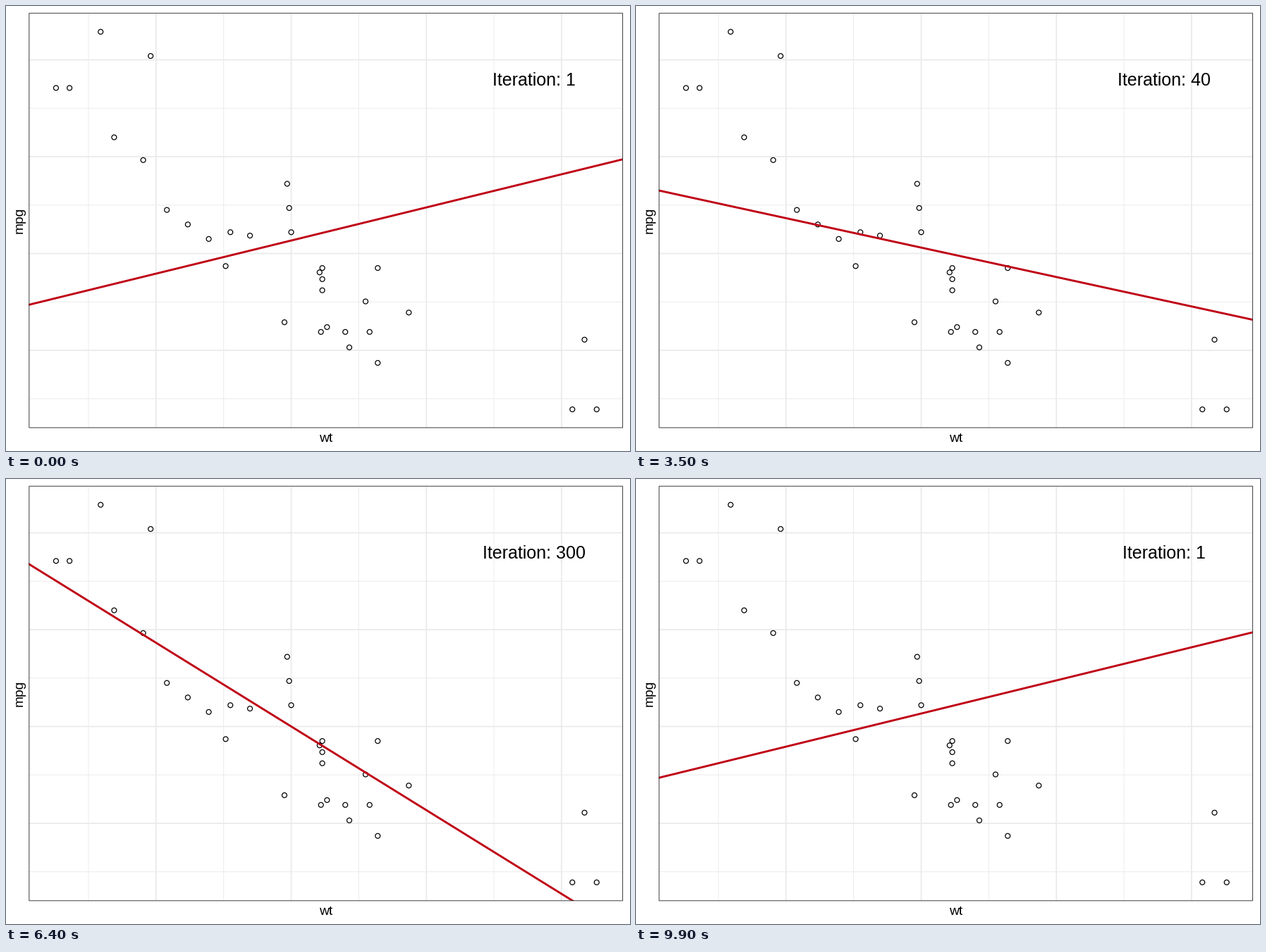
A matplotlib script for the animation above (10000 ms loop, 885 by 632 pixels).

```python
import matplotlib.pyplot as plt
import numpy as np
from matplotlib.animation import FuncAnimation
from matplotlib.patches import Rectangle
from matplotlib.transforms import Affine2D

W, H, DPI = 885, 632, 64
PT = 72 / DPI          # points per pixel
SCALE = 1.75           # pixels per plot point
ZERO_X, ZERO_Y = 404.5, 351.5
UNIT_X, UNIT_Y = 191.7, 137.5
LEFT, TOP, RIGHT, BOTTOM = 32.3, 9.7, 875.1, 599.4
LABEL_PX, TITLE_PX = 14.3 * SCALE, 11 * SCALE
RATE = 0.02
FIT_SLOPE = -0.868


def weave(keys):
    """Key points of a path, plus the middle of each leg."""
    keys = np.array(keys)
    return np.vstack([keys, (keys[1:] + keys[:-1]) / 2])


def fit(step):
    """Intercept and slope after a number of gradient descent steps."""
    k = step - 1
    a = 0.134 * (1 - RATE) ** k
    b = FIT_SLOPE + 1.21 * (1 - RATE * 31 / 32) ** k
    return a, b


cloud = np.vstack([
    weave([(0.64, -1.13), (0.22, -0.81), (0.58, -0.81), (-0.05, -0.71),
           (-0.92, 0.45), (-0.61, 0.15), (0, 0.22), (-0.03, 0.72)]),
    weave([(0.23, -0.15), (0.23, -0.38), (0.87, -0.61), (-0.45, 0.22),
           (-1.74, 1.71)]),
    [(-1.64, 1.71), (-1.41, 2.29), (-1.04, 2.04), (-1.31, 1.2),
     (0.64, -0.15), (2.17, -0.89), (2.08, -1.61), (2.26, -1.61)],
])

steps = [*range(1, 11), *range(20, 101, 10), *range(150, 1001, 50), 1]
holds = [2] + [3] * 17 + [2] + [3] * 8 + [2] * 10 + [1]
timeline = np.repeat(steps, holds)

plt.rcParams["font.family"] = "Liberation Sans"
fig = plt.figure(figsize=(W / DPI, H / DPI), dpi=DPI, facecolor="white")
pixels = Affine2D().scale(1 / W, -1 / H).translate(0, 1) + fig.transFigure

ax = fig.add_axes([LEFT / W, 1 - BOTTOM / H,
                   (RIGHT - LEFT) / W, (BOTTOM - TOP) / H])
ax.set(xlim=((LEFT - ZERO_X) / UNIT_X, (RIGHT - ZERO_X) / UNIT_X),
       ylim=((ZERO_Y - BOTTOM) / UNIT_Y, (ZERO_Y - TOP) / UNIT_Y))
ax.set_axisbelow(True)
ax.spines[:].set_visible(False)
for axis in (ax.xaxis, ax.yaxis):
    axis.set_ticks(range(-1, 3))
    axis.set_ticks(np.arange(-1.5, 2.5), minor=True)
ax.tick_params(which="both", length=0, labelbottom=False, labelleft=False)
for which, width in (("major", 1.07), ("minor", 0.53)):
    ax.grid(which=which, color="#ebebeb", lw=width * SCALE * PT, snap=False)

fig.add_artist(Rectangle(
    (LEFT + 0.5, TOP + 0.5), RIGHT - LEFT - 1, BOTTOM - TOP - 1, fill=False,
    ec="#333333", lw=0.95 * PT, snap=False, transform=pixels))

ax.scatter(*cloud.T, s=np.full(len(cloud), (3.95 * SCALE * PT) ** 2),
           facecolors="none", edgecolors="black",
           linewidths=0.71 * SCALE * PT, zorder=1.5)
ends = np.array([-3.0, 3.0])
line, = ax.plot(ends, ends, color="#bf0015", lw=2.9 * PT)


def put(x, y, text, size, **kw):
    return fig.text(x, y, text, fontsize=size * PT, color="black",
                    va="baseline", transform=pixels, **kw)


put(453.7, 618.8, "wt", TITLE_PX, ha="center")
put(23.8, 304.3, "mpg", TITLE_PX, ha="center", rotation=90,
    rotation_mode="anchor")
label = put(690, 113.4, "", LABEL_PX, ha="left")


def update(i):
    step = timeline[i]
    a, b = fit(step)
    line.set_ydata(a + b * ends)
    # centre the label on its advance width
    width = LABEL_PX * (4.169 + 0.556 * len(str(step)))
    label.set_x(749.5 - width / 2)
    label.set_text(f"Iteration: {step}")
    return line, label


anim = FuncAnimation(fig, update, frames=len(timeline), interval=100,
                     repeat=True, repeat_delay=0)
plt.show()
```
